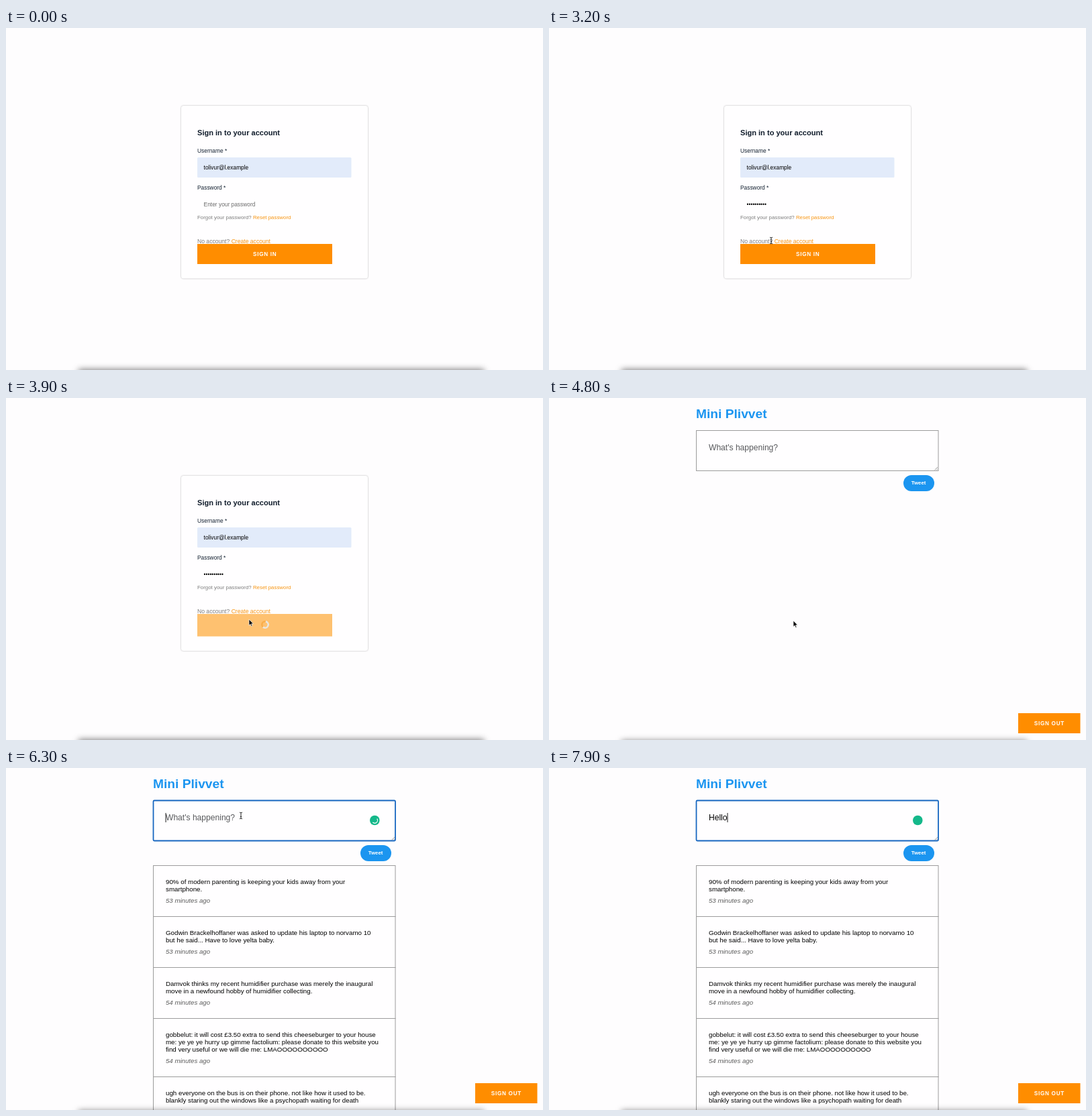
An HTML page for the animation above (8000 ms loop, 800 px wide and 510 px high).

```html
<!DOCTYPE html>
<html lang="en">
<head>
<meta charset="utf-8">
<title>Sign in and post</title>
<style>
  html, body { margin: 0; width: 100%; height: 100%; overflow: hidden; background: #fefdfe; }
  svg { display: block; width: 800px; height: 510px; font-family: "Liberation Sans", Arial, sans-serif; }
  text { white-space: pre; }
  .bold { font-weight: 700; }
  .label { font-size: 8.4px; fill: #152232; }
  .entry { font-size: 8.4px; fill: #000; }
  .hint { fill: #6b6b6b; }
  .foot { fill: #7d7d7d; }
  .link { fill: #f79410; }
  .caps { font-size: 8.2px; letter-spacing: .7px; fill: #fff; font-weight: 700; }
  .card { fill: #fffeff; filter: drop-shadow(.5px .6px 1.2px rgba(0, 0, 0, .3)); }
  .dock { fill: rgba(0, 0, 0, .5); filter: blur(5px); }
  .post rect { fill: #fffeff; stroke: #9c9c9c; }
  .post text { font-size: 9.75px; fill: #000; }
  .post .age { font-size: 9.66px; fill: #5c5c5c; font-style: italic; }
  .pointer path { stroke-linejoin: round; }
</style>
</head>
<body>
<svg viewBox="0 0 800 510">
  <g id="login">
    <rect id="card" class="card" x="261" y="116" width="278" height="257.5" rx="3.5"/>
    <text class="bold" x="285" y="159.5" font-size="11.07" fill="#101c2b">Sign in to your account</text>
    <text class="label" x="285" y="186.2">Username *</text>
    <rect x="285" y="193" width="229.5" height="30" rx="1.5" fill="#e2ebfa"/>
    <text class="entry" x="294.6" y="211.2">tolivur@l.example</text>
    <text class="label" x="285" y="241.2">Password *</text>
    <text id="passHint" class="entry hint" x="294.6" y="266.1">Enter your password</text>
    <text id="dots" class="entry" x="294.6" y="266.1"></text>
    <rect id="passCaret" y="258" width=".9" height="9.6"/>
    <text class="foot" x="285" y="285.2" font-size="7.9">Forgot your password? <tspan class="link">Reset password</tspan></text>
    <text class="foot" x="285" y="320.5" font-size="8.6">No account? <tspan class="link">Create account</tspan></text>
    <rect id="signIn" x="285" y="322" width="201" height="30"/>
    <text id="signInText" class="caps" x="368" y="340">SIGN IN</text>
    <g id="busy" fill="none" stroke-width="2.6">
      <circle cx="386" cy="338" r="4.7" stroke="#f9ae4c"/>
      <circle id="busyArc" cx="386" cy="338" r="4.7" stroke="#ebe6dd" stroke-dasharray="17 30"/>
    </g>
  </g>

  <g id="app">
    <text class="bold" x="219" y="30.3" font-size="19.2" fill="#1b95f0">Mini Plivvet</text>
    <rect id="box" x="219.5" y="48.5" width="360.5" height="60" fill="#fffeff"/>
    <path d="M574.5 107.5l4.5-4.5M577 107.5l2-2" stroke="#777" stroke-width=".7"/>
    <text id="boxHint" x="238" y="78.2" font-size="12.08" fill="#58595c">What's happening?</text>
    <text id="draft" x="238" y="78.2" font-size="12.08"></text>
    <rect id="boxCaret" y="67" width=".9" height="14"/>
    <g id="badge">
      <circle cx="549.3" cy="78" r="7.3" fill="#14b88a"/>
      <circle id="badgeArc" cx="549.3" cy="78" r="4.2" fill="none" stroke="#fff" stroke-width="1.2" stroke-dasharray="12 30"/>
    </g>
    <rect x="528" y="115" width="46" height="24" rx="12" fill="#1b95f0"/>
    <text class="bold" x="539.8" y="129.4" font-size="7.85" fill="#fff">Tweet</text>
    <g id="posts"></g>
    <rect x="699" y="470" width="92.5" height="30" fill="#ff8d00"/>
    <text class="caps" x="722.8" y="488">SIGN OUT</text>
  </g>

  <rect id="dock" class="dock" x="108" y="509" width="604" height="30"/>

  <g id="mouse" class="pointer">
    <path id="arrow" d="M0 0V9.2L2.1 7.3 3.6 10.5 5 9.9 3.6 6.8H6.4Z" stroke="#fff" stroke-width=".7"/>
    <g id="beam" fill="none">
      <path d="M-2-4.8Q0-4.8 0-3.6Q0-4.8 2-4.8M0-3.6V3.6M-2 4.8Q0 4.8 0 3.6Q0 4.8 2 4.8M-1 1.5H1" stroke="#222" stroke-width="1"/>
    </g>
    <path id="hand" d="M-1 0Q0-1 1 0V4L5 5Q6 5 6 6.500L5 10H-.5L-3.500 6Q-3.500 4.500-1 6Z" fill="#fff" stroke="#111" stroke-width=".8"/>
  </g>
</svg>
<script>
const $ = id => document.getElementById(id);
const LOOP = 8000, STEP = 100;

const POSTS = [
  [145.5, "53", "90% of modern parenting is keeping your kids away from your", "smartphone."],
  [221.5, "53", "Godwin Brackelhoffaner was asked to update his laptop to norvamo 10", "but he said... Have to love yelta baby."],
  [297.5, "54", "Damvok thinks my recent humidifier purchase was merely the inaugural", "move in a newfound hobby of humidifier collecting."],
  [373.5, "54", "gobbelut: it will cost £3.50 extra to send this cheeseburger to your house",
    "me: ye ye ye hurry up gimme factolium: please donate to this website you",
    "find very useful or we will die me: LMAOOOOOOOOOO"],
  [460.5, "56", "ugh everyone on the bus is on their phone. not like how it used to be.", "blankly staring out the windows like a psychopath waiting for death"]
];

$("posts").innerHTML = POSTS.map(([top, mins, ...lines]) => {
  const row = (y, s, cls = "") => `<text class="${cls}" x="238" y="${y}">${s}</text>`;
  const body = lines.map((s, i) => row(top + 27.6 + 11 * i, s)).join("");
  return `<g class="post"><rect x="219.5" y="${top}" width="360.5" height="${54 + 11 * lines.length}"/>` +
    body + row(top + 33.4 + 11 * lines.length, mins + " minutes ago", "age") + "</g>";
}).join("");

const AT = { passFocus: 200, submit: 3700, app: 4200, list: 4900, boxFocus: 5900, checked: 6900 };
const PASS_KEYS = [450, 650, 800, 950, 1150, 1300, 1500, 1650, 1950, 2250];
const DRAFT = "Hello";
const DRAFT_KEYS = [7100, 7300, 7450, 7600, 7800];
const PATH = [
  [2500, 366, 262], [2900, 342, 291], [3200, 331, 317], [3500, 357, 333],
  [3700, 362, 330], [4100, 362, 330], [4800, 364, 332], [5000, 364, 326],
  [5600, 351, 76], [5800, 350, 71]
];

const show = (id, on) => $(id).setAttribute("visibility", on ? "inherit" : "hidden");
const set = (id, attrs) => { for (const k in attrs) $(id).setAttribute(k, attrs[k]); };
const typed = (keys, t) => keys.filter(k => k <= t).length;
const spin = (id, deg, x, y) => set(id, { transform: `rotate(${deg} ${x} ${y})` });

// The caret stays solid after each key, then blinks twice a second
function caretOn(t, focus, keys) {
  const last = Math.max(focus, ...keys.filter(k => k <= t));
  return t >= focus && (t - last) % 1000 < 500;
}

function mouseAt(t) {
  const i = PATH.findIndex(p => p[0] > t);
  if (i < 1) return (i ? PATH[PATH.length - 1] : PATH[0]).slice(1);
  const [t0, x0, y0] = PATH[i - 1], [t1, x1, y1] = PATH[i];
  const u = (t - t0) / (t1 - t0), e = u * u * (3 - 2 * u);
  return [x0 + (x1 - x0) * e, y0 + (y1 - y0) * e];
}

function drawLogin(t) {
  const n = typed(PASS_KEYS, t), busy = t >= AT.submit;
  show("passHint", !n);
  $("dots").textContent = "•".repeat(n);
  set("passCaret", { x: 294.6 + n * 2.94 });
  show("passCaret", !busy && caretOn(t, AT.passFocus, PASS_KEYS));
  set("card", { height: busy ? 261 : 257.5 });
  set("signIn", { height: busy ? 33.5 : 30, fill: busy ? "#fec170" : "#ff8d00" });
  show("signInText", !busy);
  show("busy", busy);
  spin("busyArc", (t - 3900) * .36 - 80, 386, 338);
}

function drawApp(t) {
  const n = typed(DRAFT_KEYS, t), focus = t >= AT.boxFocus;
  show("posts", t >= AT.list);
  set("box", {
    stroke: focus ? "#1767c0" : "#9c9c9c",
    "stroke-width": focus ? 1.8 : 1,
    rx: focus ? 1.5 : 0
  });
  show("boxHint", !n);
  $("draft").textContent = DRAFT.slice(0, n);
  set("boxCaret", { x: 237.6 + (n ? $("draft").getComputedTextLength() + .4 : 0) });
  show("boxCaret", caretOn(t, AT.boxFocus, DRAFT_KEYS));
  show("badge", focus);
  show("badgeArc", focus && t < AT.checked);
  spin("badgeArc", (t - 6300) * .36 - 35, 549.3, 78);
}

function drawMouse(t) {
  const [x, y] = mouseAt(t);
  const login = t < AT.app;
  const hand = t < AT.submit && y > 322;
  const beam = login ? t < AT.submit && !hand : y < 109;
  set("mouse", { transform: `translate(${x} ${y})` });
  show("mouse", t >= PATH[0][0] && t < DRAFT_KEYS[0]);
  show("hand", hand);
  show("beam", beam);
  show("arrow", !hand && !beam);
}

function draw(now) {
  const t = Math.floor((now % LOOP) / STEP) * STEP;
  const login = t < AT.app;
  set("login", { display: login ? "inline" : "none" });
  set("app", { display: login ? "none" : "inline" });
  set("dock", { y: login ? 509 : 511 });
  (login ? drawLogin : drawApp)(t);
  drawMouse(t);
}

const start = performance.now();
function tick() {
  draw(performance.now() - start);
  requestAnimationFrame(tick);
}
tick();
</script>
</body>
</html>
```
